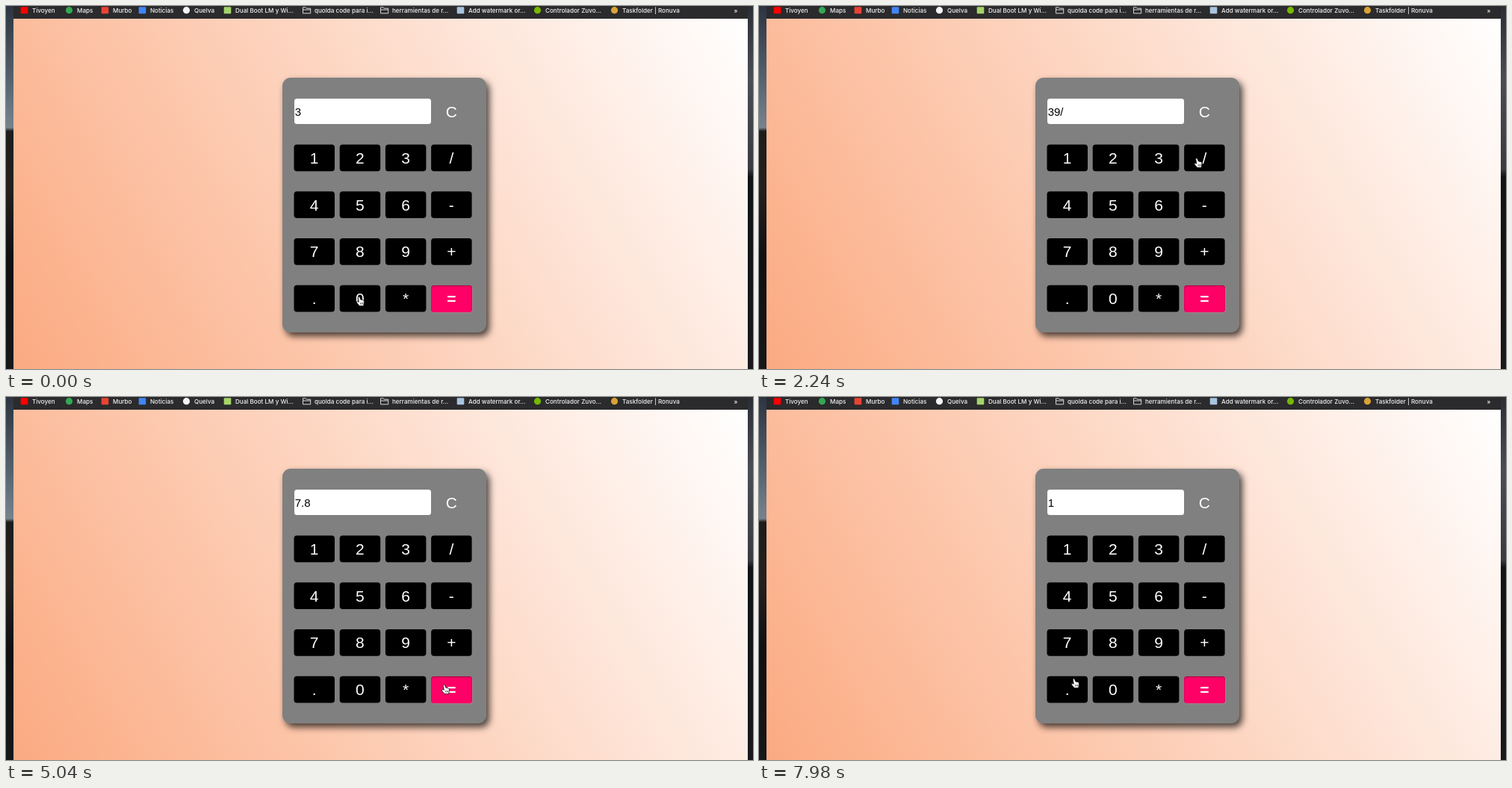
An HTML page for the animation above (8 s loop, 1000x486 px).

```html
<!DOCTYPE html>
<html lang="es">
<head>
<meta charset="utf-8">
<title>Calculadora</title>
<style>
  html, body { margin: 0; width: 100%; height: 100%; overflow: hidden; background: #14171a; }
  .stage { position: relative; width: 1000px; height: 486px; overflow: hidden; }
  .stage > * { position: absolute; }
  .left { left: 0; top: 0; width: 10px; height: 486px;
    background: linear-gradient(#2c3540, #55616e 20%, #78838e 33.5%, #1d1d1c 34.5%, #25211d 50%, #0e1011 70%, #16181a); }
  .right { left: 993px; top: 0; width: 7px; height: 486px;
    background: linear-gradient(#2b2e35, #4a4d55 20%, #3a3b40 45%, #111315 47%, #17191c); }
  .page { left: 10px; top: 16px; width: 983px; height: 470px; background: linear-gradient(60deg, #fbaa81, #fff); }
  .bar { left: 10px; top: 0; width: 983px; height: 16.5px; background: #2b2a2c; }
  .panel { left: 370px; top: 96px; width: 273px; height: 341px; border-radius: 11px;
    background: #808080; box-shadow: 4px 5px 10px rgba(0, 0, 0, .72); }
  .screen { left: 385.5px; top: 124px; width: 183.5px; height: 34px; border-radius: 3.5px; background: #fff; }
  .equals { left: 569px; top: 374px; width: 54.5px; height: 35.5px; border-radius: 4px; background: #ff0066;
    box-shadow: inset 0 1px 2px rgba(70, 0, 30, .55), 1px 1px 2px rgba(255, 120, 170, .35); }
  svg { left: 0; top: 0; }
  .tab { font: 500 8.1px Inter, "Open Sans", sans-serif; fill: #f2f2f2; }
  .key { font: 21px "Liberation Sans", Arial, sans-serif; fill: #fff; text-anchor: middle; }
  .bold { font-weight: bold; }
  #value { font: 15px "Liberation Sans", Arial, sans-serif; fill: #000; }
  .glow { fill: #fff; opacity: 0; }
  .glow.on { opacity: .12; }
</style>
</head>
<body>
<div class="stage">
  <div class="left"></div>
  <div class="right"></div>
  <div class="page"></div>
  <div class="bar"></div>
  <div class="panel"></div>
  <div class="screen"></div>
  <div class="equals"></div>
  <svg width="1000" height="486" viewBox="0 0 1000 486">
    <g id="tabs"></g>
    <g id="keys"></g>
    <text id="value" x="386.7" y="146.8"></text>
    <g id="cursor">
      <g id="hand" stroke="#111" stroke-width=".8" stroke-linejoin="round">
        <path fill="#fff" d="M-.9 1Q0-.7 1.4.6L2.8 4.1 6.3 4.8Q7.7 5.4 7.4 8L6.6 12.4H1L-2.7 8Q-2.9 6 -.5 6.9L.3 7.3Z"/>
        <path fill="none" stroke-width=".6" d="M2.6 8V10.6M4.2 8V10.6M5.7 8V10.4"/>
      </g>
      <path id="arrow" fill="#000" stroke="#fff" stroke-width=".9" d="M0 0V10.3L2.4 8.2 4 12 5.7 11.3 4.1 7.6H7.3Z"/>
    </g>
  </svg>
</div>
<script>
const LOOP = 8000, STEP = 70;
const $ = id => document.getElementById(id);

function add(parent, tag, attrs, text) {
  const el = document.createElementNS('http://www.w3.org/2000/svg', tag);
  for (const k in attrs) el.setAttribute(k, attrs[k]);
  if (text) el.textContent = text;
  return parent.appendChild(el);
}

// Bookmarks: text x, label, icon kind, icon colour
const tabs = [
  [35, 'Tivoyen', 'square', '#f00'],
  [95, 'Maps', 'circle', '#34a853'],
  [143, 'Murbo', 'square', '#ea4335'],
  [193, 'Noticias', 'square', '#4285f4'],
  [252, 'Quelva', 'circle', '#f4f4f4'],
  [307, 'Dual Boot LM y Wi...', 'square', '#a5d46a'],
  [413, 'quolda code para i...', 'folder'],
  [517, 'herramientas de r...', 'folder'],
  [619, 'Add watermark or...', 'square', '#a9c4df'],
  [722, 'Controlador Zuvo...', 'circle', '#76b900'],
  [825, 'Taskfolder | Ronuva', 'circle', '#d9a336'],
  [974.5, '»']
];
for (const [x, label, kind, fill] of tabs) {
  const cx = x - 10.5, g = $('tabs');
  if (kind === 'circle') add(g, 'circle', { cx, cy: 5.7, r: 4.6, fill });
  if (kind === 'square') add(g, 'rect', { x: cx - 4.8, y: 1.2, width: 9.6, height: 9, rx: 1, fill });
  if (kind === 'folder') add(g, 'path', {
    d: `M${cx - 5} 9.8V1.8h3.6l1.2 1.4h5.4v6.6zM${cx - 5} 5h10.2`,
    fill: 'none', stroke: '#d5d5d5', 'stroke-width': 1
  });
  add(g, 'text', { x, y: 8.6, class: 'tab' }, label);
}

// Keypad
const keys = {};
function addKey(label, col, y, fill) {
  const box = { x: 385.5 + col * 61.2, y, width: 54.5, height: 35.7, rx: 4 };
  add($('keys'), 'rect', { ...box, fill });
  const glow = add($('keys'), 'rect', { ...box, class: 'glow' });
  add($('keys'), 'text', {
    x: box.x + 27.2, y: y + 25.4, class: label === '=' ? 'key bold' : 'key'
  }, label);
  keys[label] = { ...box, glow };
}
addKey('C', 3, 123.2, 'none');
['123/', '456-', '789+', '.0*='].forEach((row, r) =>
  [...row].forEach((label, c) => addKey(label, c, 185.6 + r * 62.7, label === '=' ? 'none' : '#000')));

// Presses: key, down, up, value shown after release
const presses = [
  ['9', 700, 840, '39'],
  ['/', 1750, 1960, '39/'],
  ['5', 2660, 2800, '39/5'],
  ['=', 4060, 4130, '7.8'],
  ['C', 6440, 6510, ''],
  ['1', 7420, 7490, '1']
];

// Pointer tip: time, x, y
const path = [
  [0, 472, 389], [700, 527, 329], [1050, 527, 329], [1400, 579, 200], [1610, 590, 201],
  [2170, 590, 201], [2730, 486, 266], [3010, 488, 267], [3850, 586, 385],
  [4410, 586, 385], [4480, 587, 386], [4970, 587, 386], [5040, 586, 385],
  [5110, 586, 385], [5950, 575, 178], [6020, 576, 175], [6300, 595, 140],
  [6580, 595, 140], [7280, 428, 196], [7420, 427, 196], [7980, 421, 377]
];
function tipAt(t) {
  const i = path.findIndex(p => p[0] > t);
  if (i < 0) return path[path.length - 1].slice(1);
  const [t0, x0, y0] = path[i - 1], [t1, x1, y1] = path[i];
  const u = (t - t0) / (t1 - t0), e = u * u * (3 - 2 * u);
  return [x0 + (x1 - x0) * e, y0 + (y1 - y0) * e];
}

function draw(now) {
  const t = Math.floor((now % LOOP) / STEP) * STEP;
  let value = '3';
  for (const [label, down, up, after] of presses) {
    keys[label].glow.classList.toggle('on', t >= down && t < up);
    if (t >= up) value = after;
  }
  $('value').textContent = value;

  const [x, y] = tipAt(t);
  const over = Object.values(keys).some(k =>
    x >= k.x && x <= k.x + k.width && y >= k.y && y <= k.y + k.height);
  $('cursor').setAttribute('transform', `translate(${x} ${y})`);
  $('hand').style.display = over ? '' : 'none';
  $('arrow').style.display = over ? 'none' : '';
}

const start = performance.now();
function tick() {
  draw(performance.now() - start);
  requestAnimationFrame(tick);
}
tick();
</script>
</body>
</html>
```
